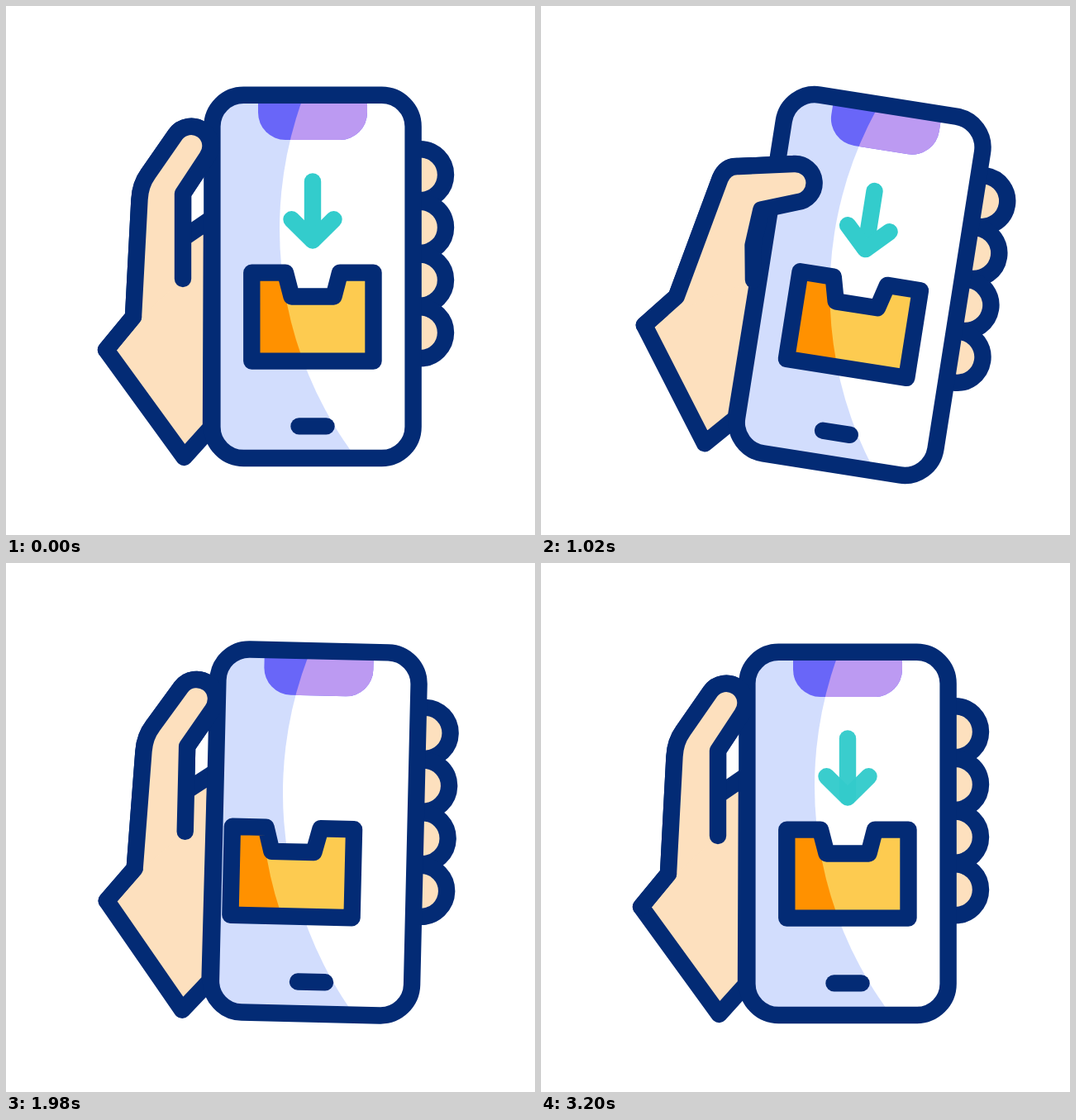
Animation, 640 px wide and 640 px high, one loop 3.42 s. Source, as an HTML page:

```html
<!DOCTYPE html>
<html lang="en">
<head>
<meta charset="utf-8">
<title>Phone in hand</title>
<style>
  html, body { margin: 0; width: 100%; height: 100%; overflow: hidden; background: #fff; }
  svg { display: block; width: 100%; height: 100%; }
  .line { stroke: #032b75; stroke-width: 20.4; stroke-linecap: round; stroke-linejoin: round; }
  .skin { fill: #fde0be; }
</style>
</head>
<body>
<svg viewBox="0 0 640 640" fill="none">
  <defs>
    <clipPath id="screen"><rect x="249.4" y="107.8" width="243.2" height="439.2" rx="38"/></clipPath>
    <clipPath id="lit"><circle cx="791" cy="270" r="460"/></clipPath>
    <path id="notch" d="M305 100H437V129A33 33 0 0 1 404 162H338A33 33 0 0 1 305 129Z"/>
    <path id="box" d="M297.3 322.6H338L345.5 351.5H396.5L404 322.6H444.5V429.6H297.3Z"/>
  </defs>
  <g id="scene">
    <g id="fingers" class="line skin"></g>
    <path id="palm" class="line skin"/>
    <g clip-path="url(#screen)">
      <path fill="#d2ddfd" d="M240 98H503V557H240Z"/>
      <circle cx="791" cy="270" r="460" fill="#fff"/>
      <use href="#notch" fill="#6966f8"/>
      <use href="#notch" fill="#bc9af2" clip-path="url(#lit)"/>
      <g id="tray">
        <use href="#box" fill="#ff9100"/>
        <use href="#box" fill="#fdcb50" clip-path="url(#lit)"/>
        <use href="#box" class="line"/>
      </g>
      <path class="line" d="M354.5 508.4H387.5"/>
    </g>
    <g id="arrow" stroke="#33cccc" stroke-width="20.4" stroke-linecap="round" stroke-linejoin="round">
      <path d="M371 212.5V283"/>
      <path d="M345.5 258.3L371 283.5L396.5 258.3"/>
    </g>
    <rect class="line" x="249.4" y="107.8" width="243.2" height="439.2" rx="38"/>
    <circle id="ring" cx="311" cy="226" stroke="#33cccc" stroke-width="20"/>
    <path id="thumb" class="line skin"/>
  </g>
</svg>
<script>
const LOOP = 3420;
const $ = id => document.getElementById(id);
const set = (id, attrs) => { for (const k in attrs) $(id).setAttribute(k, attrs[k]); };
const span = (t, a, b) => Math.min(1, Math.max(0, (t - a) / (b - a)));
const ease = (t, a, b) => { const u = span(t, a, b); return u * u * (3 - 2 * u); };
// rises from a to b, holds, falls from c to d
const swell = (t, a, b, c, d) => ease(t, a, b) - ease(t, c, d);

$('fingers').innerHTML = [0, 1, 2, 3]
  .map(i => `<circle cx="501" cy="${204.2 + 63.7 * i}" r="31"/>`).join('');

// thumb outline from the knuckle over the tip to the end of the crease
const STRAIGHT = [[161.5, 234], [162.5, 216], [172, 203], [205, 155.5], [243, 183], [214, 227], [214, 281], [214, 330]];
const BENT = [[184, 227], [188, 210], [204, 208.5], [269, 195.2], [280, 240.4], [239, 256], [236, 300], [243, 341.5]];

function drawHand(bend) {
  const [a, b, c, d, e, f, g, h] = STRAIGHT.map((p, i) =>
    p.map((v, k) => v + (BENT[i][k] - v) * bend));
  const edge = `M121 416L154 376L${a}Q${b} ${c}L${d}A20 20 0 0 1 ${e}L${f}L${g}`;
  set('palm', { d: `${edge}L249 257L248 510L215.5 546Z` });
  set('thumb', { d: `${edge}L${h}` });
}

function draw(t) {
  const angle = 9.5 * swell(t, 200, 1160, 1240, 2210);
  const x = 371 + 17.8 * swell(t, 200, 1320, 1320, 2200);
  const y = 327 + 13.5 * ease(t, 200, 720) - 21.5 * ease(t, 850, 1530) + 8 * ease(t, 1530, 2150);
  set('scene', { transform: `translate(${x} ${y}) rotate(${angle}) translate(-371 -327)` });

  drawHand(swell(t, 200, 800, 1140, 1560));

  const slide = t < 2310
    ? -205 * span(t, 1600, 2225) ** 4.15
    : 205 * (1 - span(t, 2400, 2960)) ** 4.5;
  set('tray', { transform: `translate(${slide})` });

  const drop = t < 2500 ? 50 * span(t, 1280, 1720) ** 2 : 0;
  const shown = 1 - span(t, 1500, 1720) + span(t, 2950, 3210);
  set('arrow', { transform: `translate(0 ${drop})`, 'stroke-opacity': shown });

  const u = span(t, 1200, 1680);
  set('ring', { r: 42 * (1 - (1 - u) ** 2), opacity: u > 0 ? 1 - u : 0 });
}

const start = performance.now();
function tick() {
  draw((performance.now() - start) % LOOP);
  requestAnimationFrame(tick);
}
tick();
</script>
</body>
</html>
```
